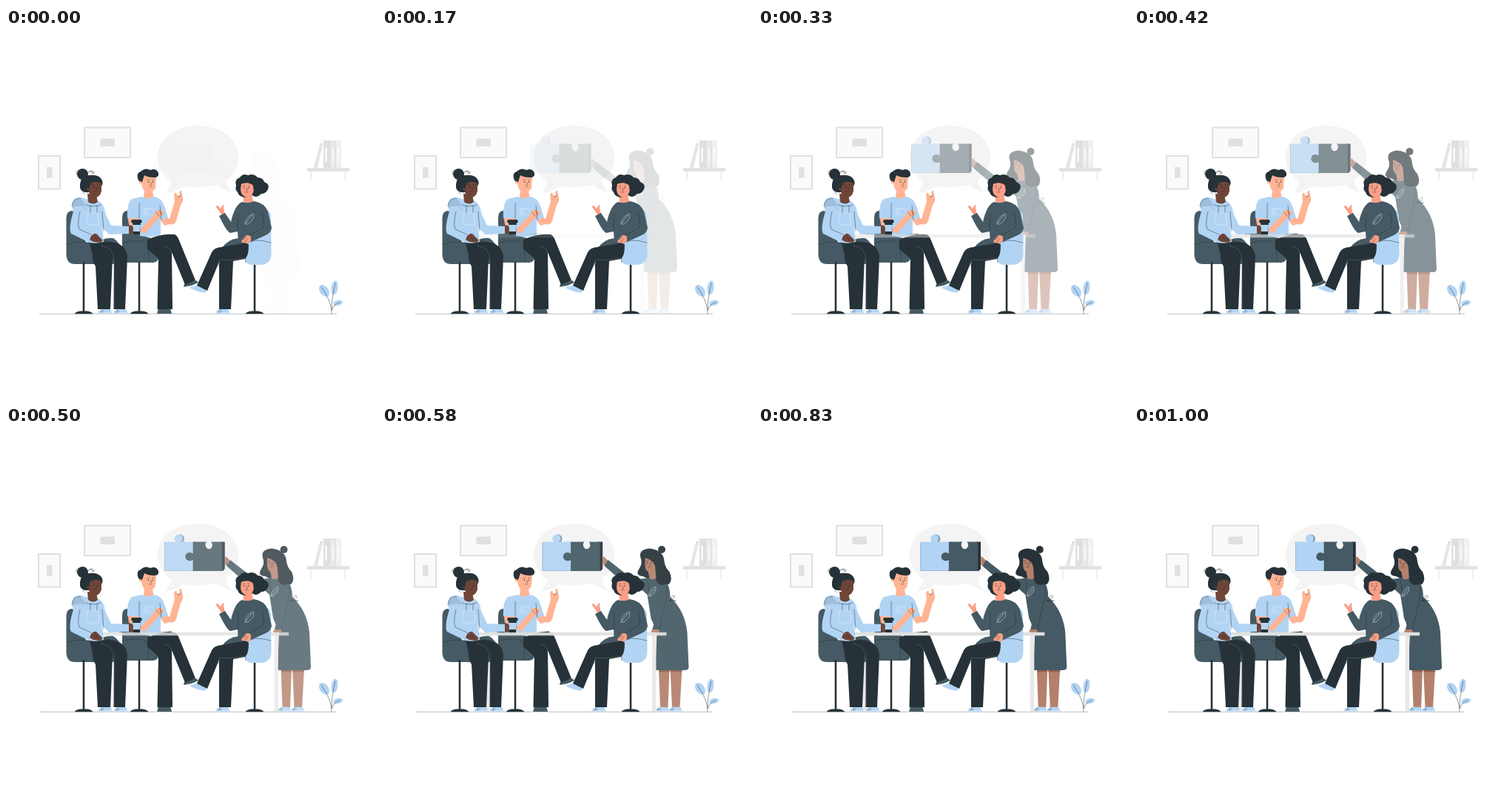
These frames come from a looping animation (500x500 px, 1.04 s). An HTML page:

```html
<!DOCTYPE html>
<html lang="en">
<head>
<meta charset="utf-8">
<title>Team discussion</title>
<style>
  html, body { margin: 0; width: 100%; height: 100%; overflow: hidden; background: #fff; }
  svg { display: block; width: 100%; height: 100%; }
  .ink { fill: #263238; }
  .slate { fill: #455a64; }
  .blue { fill: #b2d4f4; }
  .pale { fill: #f4f4f4; }
  .grey { fill: #e0e0e0; }
  .brown { fill: #6f4537; }
  .tan { fill: #b4806c; }
  .peach { fill: #ffb494; }
  .rose { fill: #fb9f86; }
  .line { fill: none; stroke: #263238; stroke-width: .5; stroke-linecap: round; stroke-linejoin: round; }
  .soft { fill: none; stroke: #65727a; stroke-width: .5; }
  .thin { fill: none; stroke: #e8eff4; stroke-width: .5; stroke-linejoin: round; }
</style>
</head>
<body>
<svg viewBox="0 0 500 500">
  <defs>
    <g id="stand">
      <path class="ink" d="M-1.300 0V-70H1.300V0zM-12.500 .2Q-10-3.800 0-3.800T12.500 .2z"/>
    </g>
    <g id="shoe">
      <path class="blue" d="M4 0H16Q17 3 19 6.300H-1Q-1 3.500 2 2.500z"/>
      <path d="M-1 5.300H19" stroke="#fff" stroke-width=".7"/>
      <path class="line" d="M4 1.500l3 1.800M2 3.500l3 1"/>
    </g>
    <g id="face">
      <ellipse class="ink" cx="-3" cy="-1" rx=".7" ry="1"/>
      <ellipse class="ink" cx="4" cy="-1" rx=".7" ry="1"/>
      <path class="line" d="M-5-4q2-1.500 3.500-.5M3-4.500q2-1 3 .3M1-1l1 4h-2M-2 5.500q3 1.800 5-.3"/>
    </g>
  </defs>

  <!-- room -->
  <path d="M106 134.500h62v40.500h-62zM44 173h29v44.500H44z" fill="#fafafa" stroke="#e0e0e0" stroke-width="2"/>
  <path class="grey" d="M127.500 149.500h19.500v10.500h-19.500zM55 188h7.500v14.500H55z"/>
  <path class="grey" d="M407 189.300h57v4.500h-57zM411.500 193h1v13h-1zM457.500 193h1v13h-1z"/>
  <path fill="#e4e4e4" d="M424.500 155l4 1-8 33h-4.500z"/>
  <path class="grey" d="M429 152h9v37.300h-9z"/>
  <path fill="#eaeaea" d="M438 152h7.500v37.300H438z"/>
  <path fill="#f0f0f0" d="M445.500 152h7.500v37.300h-7.500z"/>
  <path fill="#fff" d="M431.500 162h2v19h-2zM441 162h1.500v19H441zM448 162h2v19h-2z"/>
  <path fill="#d8d8d8" d="M437 152h1v37h-1zM444.500 152h1v37h-1z"/>
  <path class="pale" d="M259 132C292 132 314 151 314 174C314 187 308 199 297 206Q299 216 306 222Q293 220 285 212Q264 218 240 214Q229 222 215 223Q222 216 223 207C211 199 205 187 205 174C205 151 227 132 259 132z"/>
  <path d="M45 386.300H447" stroke="#263238" stroke-width=".3"/>
  <g class="blue">
    <ellipse cx="430" cy="355" rx="5.800" ry="9" transform="rotate(-38 430 355)"/>
    <ellipse cx="444" cy="351" rx="4.500" ry="9.500" transform="rotate(8 444 351)"/>
    <ellipse cx="448.500" cy="371.500" rx="6.500" ry="3.500" transform="rotate(-12 448.500 371.500)"/>
  </g>
  <path class="line" d="M440 386Q441 371 426 350M440 380Q440 365 445 345M440.500 382Q442 373 451 371"/>

  <!-- puzzle -->
  <g class="enter">
    <circle cx="239" cy="152.500" r="6" fill="#7f9bb4"/>
    <path class="blue" d="M218 156.500H234Q230.500 153 232.500 149.500A5.700 5.700 0 0 1 242.500 150Q243.500 154 240.500 156.500H258V195.500H218z"/>
    <path d="M218 195.500h40M218.500 157v38" stroke="#8fb2d2" stroke-width=".8"/>
    <path class="ink" d="M294 156.500h5.700v36.500l-2.700 3h-3z"/>
    <path class="slate" d="M257 156.500H274.500Q271.500 161 275 165Q279 168 282 164Q284 160 281 156.500H296V196H257V180.500Q253 183 249 181A5.500 5.500 0 0 1 249 172Q253 170 257 173z"/>
    <path class="pale" d="M276 156Q273.500 161 276 164Q279 167 281.500 163.500Q283 160 280.500 156z"/>
    <path class="line" d="M257 157v16q-4-3-8-1a5.500 5.500 0 0 0 0 9q4 2 8-.5v15.500M274 156.500q-3 5 1 8.500"/>
  </g>

  <!-- standing woman -->
  <g class="enter">
    <path class="tan" d="M375.500 327h14.500l-2 54h-10.500zM391 327h16l-3 54h-10.500z"/>
    <path d="M376 331h14M391 331h16" stroke="#93614f" stroke-width="3"/>
    <use href="#shoe" x="371" y="379.800"/>
    <use href="#shoe" x="389" y="379.800"/>
    <circle class="ink" cx="379.500" cy="167" r="5"/>
    <path class="ink" d="M354 168Q362 163 373 168Q383 173 383 183Q384 191 390 197Q395 208 389 214Q378 218 368 210L354 203Q343 202 349 193Q354 186 351 178Q349 171 354 168z"/>
    <path class="tan" d="M300 179Q300 175 302 177L306 181 309 186 305 191 300 187z"/>
    <path class="slate" d="M307 181L334 202Q348 209 361 205Q373 202 383 207Q391 216 391 231Q411 250 414 279L416 326Q416 330 410 330H373Q370 330 371 324L373 278 365 260 360 228 350 219Q332 213 319 204L302 189z"/>
    <path class="tan" d="M361 196l12-2 1 10q-5 5-11 2zM368 273h9l-1 6h-10q-2-1 0-3z"/>
    <path class="slate" d="M380 212Q387 217 386 232L378 275H367L375 238z"/>
    <path class="tan" d="M357 177Q364 173 371 179L372 193Q369 199 364 198Q357 196 357 189z"/>
    <path class="ink" d="M356 178Q359 172 368 174Q377 177 376 190Q379 199 386 201L388 213Q376 218 372 209L371 194Q371 181 356 178z"/>
    <use href="#face" transform="translate(362.500 186) scale(.85)"/>
    <path class="line" d="M386 215Q389 225 383 246L376 276M360 208l3 17M389 236q5-9 8-6q1 3-8 6q8-1 10 0q-2 2-10 0"/>
    <path class="thin" d="M362 230Q363 221 371 217Q374 223 365 230zM363 230l7-10"/>
  </g>

  <!-- man -->
  <path class="slate" d="M163 247Q157 248 157 256V309Q157 317 165 317H199Q207 316 207 307V287L189 282 173 267 170 247z"/>
  <path class="line" d="M158 290Q183 285 189 291Q193 297 193 316"/>
  <use href="#stand" x="180" y="386"/>
  <path class="slate" d="M206 379h16l2 7h-20zM241 346l15-5q3 1 4 3l-9 4-11 2z"/>
  <path class="ink" d="M191 286Q210 277 228 279Q232 281 234 287L256 341 242 347 224 303 225 380H204.500L206 312Q196 302 191 299z"/>
  <path class="soft" d="M214 295q9 1 10 10"/>
  <path class="peach" d="M187 219l11 2 2 9q-6 6-14 0z"/>
  <path class="peach" d="M164 252h13l5 12 18-13q0-5 3-7l1 3q3-2 7-3l4 4-5 7-9 3-18 20q-9 4-16-6z"/>
  <path class="blue" d="M183 228Q192 232 200 228Q209 229 213 238L219 256 209 260V279Q199 284 181 281L180 257H164Q163 237 170 231z"/>
  <path class="peach" d="M209 260l9-4 3 2 7-24-1-8q1-4 3-3l2 4 3-7q3-1 2 3l2 6q1 5-3 10l-6 22q-3 6-9 4l-7 2z"/>
  <path class="peach" d="M180 274L200 252 203 246 211 246 214 250 205 259 187 278z"/>
  <circle cx="234" cy="225" r="1.800" fill="#fff"/>
  <path class="line" d="M180 237v22M208 240l2 19M203 249l5 6M207 247l4 5M232 228q4 1 4-4"/>
  <path class="thin" d="M187 252v-8h11v4M187 252h8M190 244v8"/>
  <path class="peach" d="M184 200Q194 194 203 202L202 216Q198 224 191 222Q184 220 183 210Q179 211 180 206z"/>
  <path class="ink" d="M179 206Q175 196 182 194Q188 188 195 192Q203 189 206 196Q207 202 200 202Q192 202 187 199L184 208 181 207z"/>
  <use href="#face" transform="translate(195 209) scale(.85)"/>

  <!-- table -->
  <g class="enter">
    <path fill="#e8e8e8" d="M141 283h5.500v103H141zM366.500 283h5.500v103h-5.500z"/>
    <path class="grey" d="M128.500 278.800H386v4.500H128.500z"/>
    <path class="ink" d="M157 278h10v.9h-10zM210 278.900l17-1.500 1.500 1.500z"/>
  </g>

  <!-- woman with cup -->
  <path class="slate" d="M88 247Q82 248 81.500 256V306Q82 319 93 319H146Q156 319 156 302Q155 290 145 284Q136 283 128 287L108 290 96 249z"/>
  <path class="line" d="M82 292Q108 286 114 292Q118 298 118 318M133 287Q149 288 154 306"/>
  <use href="#stand" x="105" y="386"/>
  <use href="#shoe" x="146" y="379.800"/>
  <use href="#shoe" x="125" y="379.800"/>
  <path class="ink" d="M113 289H141Q162 291 164 309L161 380H145.500L146 318 144 310 141 380H124L121 322Q117 316 117 308z"/>
  <path class="soft" d="M128 294Q145 296 146 313V378"/>
  <path class="blue" d="M92 231Q99 227 108 231L126 234Q133 239 134 250L142 267 168 268 168 278 139 279 130 269 132 289Q122 292 113 290L88 278Q84 271 91 248Q87 237 92 231z"/>
  <path d="M89 240Q91 231 101 231Q106 236 108 242Q99 238 89 243z" fill="#9fbdd8"/>
  <path class="line" d="M100 248Q96 265 99 272L115 279M130 248l2 26M89 240Q91 230 101 230M108 239q10 4 20 0M114 240v10M123 240v9"/>
  <path class="thin" d="M109 250h15l2 16h-15z"/>
  <path class="brown" d="M115 281q4-4 7-3l8 8q1 3-3 4l-9-1-5-3zM166 266l9 3 1 8-10 1zM110 224l12 1 2 10q-6 5-13 0z"/>
  <path class="line" d="M120 282l6 4M118 284l6 3"/>
  <circle class="ink" cx="103.500" cy="197.500" r="7.500"/>
  <path class="line" d="M110 197q5-6 8-3q3 2-2 3M112 194q4-1 6 2M98 192q-5 2-2 6M105 219q-2 4 1 6M125 204q4 1 5 5"/>
  <path class="ink" d="M100 211Q101 200 112 199Q126 197 130 206Q132 213 127 215L112 222Q102 223 100 216z"/>
  <path class="brown" d="M112 209Q121 205 129 210L129 221Q126 230 119 229Q112 227 112 220Q108 219 109 214z"/>
  <path class="ink" d="M109 216Q108 207 118 205Q126 204 130 209Q121 206 114 210L112 218z"/>
  <use href="#face" transform="translate(121 216) scale(.85)"/>
  <path class="ink" d="M170 259h13l1 4h-15zM171 263h11l-1 16h-9z"/>
  <path class="blue" d="M171 266h11l-1 9h-9.500z"/>
  <path class="brown" d="M167 267q4 0 5 3l-1 7-4 1z"/>

  <!-- woman on the right -->
  <use href="#stand" x="336" y="386"/>
  <path class="slate" d="M292 297Q299 286 314 284L324 290z"/>
  <path class="blue" d="M343 244Q357 244 358 254L358.500 306Q358 319 345 320H330Q322 318 322 305V292L337 280z"/>
  <path class="line" d="M358 290Q333 283 326 292Q322 300 324 317"/>
  <use href="#shoe" x="284" y="379.800"/>
  <path class="blue" d="M259 347l13 6-3 5q-8 0-20-6v-2q5 0 10-3z"/>
  <path d="M249 352q11 6 20 6" fill="none" stroke="#fff" stroke-width=".7"/>
  <path class="ink" d="M324 290L328 293Q328 308 323 312L307 315 304 380H288L288 316 272 355 258 348 278 303Q281 297 291 296z"/>
  <path class="soft" d="M322 311Q301 315 289 313L287 322"/>
  <path class="rose" d="M320 225l12-2 2 12q-7 5-13 0z"/>
  <path class="rose" d="M292 254l-3-5-5-7q0-3 2-2l4 4 3-5q2 0 1 3l1 7 2 3z"/>
  <path class="slate" d="M319 235Q327 238 335 234Q349 236 354 248L359 270Q358 277 351 280L331 289 327 282 324 291H314L313 275 303 277Q298 275 288 254L296 250 304 262Q309 239 319 235z"/>
  <path class="rose" d="M331 282q-5-4-8 0l-5 6q0 3 4 2l4 1q6 0 5-9z"/>
  <path class="line" d="M346 249Q350 263 347 270L330 279M314 252l-1 23M321 286l4-3M323 289l4-4"/>
  <path class="thin" d="M323 265Q324 255 334 251Q337 258 327 265zM324 264l8-11"/>
  <path class="ink" d="M311 213Q308 205 316 202Q320 196 327 199Q335 196 340 202Q347 202 349 208Q357 211 354 218Q351 224 345 224Q338 231 333 226L325 229Q315 229 313 222Q309 218 311 213z"/>
  <path class="rose" d="M318 209Q326 204 334 210L335 219Q332 231 325 229Q317 226 317 218z"/>
  <path class="ink" d="M315 212Q317 203 328 203Q338 205 339 215L335 221 334 213Q327 206 315 212z"/>
  <use href="#face" transform="translate(324.500 217) scale(.85)"/>
</svg>
<script>
  const LOOP = 1040, LEAD = 30, SLIDE = 1000, DISTANCE = 20;
  const groups = document.querySelectorAll('.enter');

  const bezier = (a, b, u) => 3 * a * u * (1 - u) ** 2 + 3 * b * u * u * (1 - u) + u ** 3;

  // Ease with a small overshoot: cubic-bezier(.36, -.01, .5, 1.38)
  function ease(x) {
    let low = 0, high = 1;
    for (let i = 0; i < 24; i++) {
      const mid = (low + high) / 2;
      if (bezier(.36, .5, mid) < x) low = mid; else high = mid;
    }
    return bezier(-.01, 1.38, high);
  }

  const start = performance.now();

  function draw() {
    const time = (performance.now() - start) % LOOP;
    const p = ease(Math.min(1, (time + LEAD) / SLIDE));
    for (const g of groups) {
      g.setAttribute('transform', `translate(${DISTANCE * (p - 1)} 0)`);
      g.setAttribute('opacity', Math.max(0, Math.min(1, p)));
    }
    requestAnimationFrame(draw);
  }
  draw();
</script>
</body>
</html>
```
